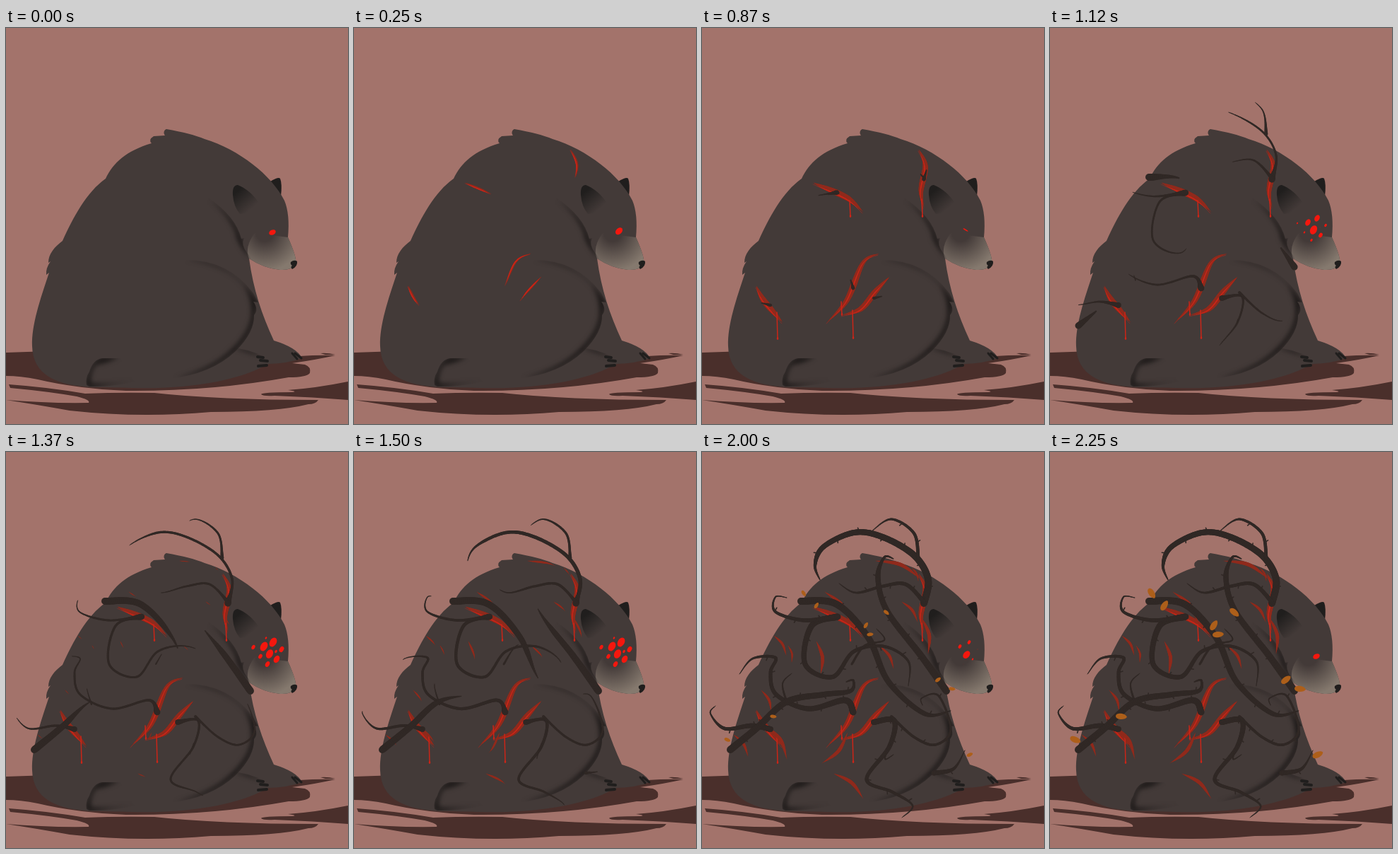
An HTML page with a canvas for the animation above (2500 ms loop, 484 px wide and 560 px high).

```html
<!DOCTYPE html>
<html>
<head>
<meta charset="utf-8">
<style>
html, body { margin: 0; width: 100%; height: 100%; overflow: hidden; background: #a3736b; }
canvas { display: block; }
</style>
</head>
<body>
<canvas id="stage" width="484" height="560"></canvas>
<script>
const ctx = document.getElementById('stage').getContext('2d');
const FUR = '#433a38', DARK = '#201e1d', VINE = '#302825', GROUND = '#4a2f2b';
const GASH = '#902a1c', BLOOD = '#cb2518', EYE = '#f5170e', LEAF = '#ad5f1a';

// Progress from 0 to 1 between steps a and b
const ramp = (k, a, b) => Math.max(0, Math.min(1, (k - a) / (b - a)));
const easeOut = x => 1 - (1 - x) ** 2;
const points = text => text.split(' ').map(s => s.split(',').map(Number));

// Catmull-Rom samples [x, y, distance]
function curve(p) {
  const out = [[...p[0], 0]];
  for (let i = 0; i < p.length - 1; i++) {
    const a = p[i - 1] || p[i], b = p[i], c = p[i + 1], d = p[i + 2] || c;
    for (let n = 1; n <= 20; n++) {
      const t = n / 20;
      const [x, y] = [0, 1].map(j => b[j] + t / 2 * (c[j] - a[j] +
        t * (2 * a[j] - 5 * b[j] + 4 * c[j] - d[j] + t * (3 * (b[j] - c[j]) + d[j] - a[j]))));
      const q = out[out.length - 1];
      out.push([x, y, q[2] + Math.hypot(x - q[0], y - q[1])]);
    }
  }
  return out;
}
const total = c => c[c.length - 1][2];

// Stroke a curve up to a length, with a width that depends on the distance
function brush(c, color, length, width) {
  ctx.strokeStyle = color;
  for (let i = 1; i < c.length && c[i][2] <= length; i++) {
    ctx.lineWidth = Math.max(.3, width(c[i][2]));
    ctx.beginPath();
    ctx.moveTo(c[i - 1][0], c[i - 1][1]);
    ctx.lineTo(c[i][0], c[i][1]);
    ctx.stroke();
  }
}

function spindle(c, color, w, grown = 1) {
  const end = total(c) * grown;
  brush(c, color, end, s => w * Math.sin(Math.PI * Math.min(1, s / end)));
}

function fill(path, color) {
  ctx.fillStyle = color;
  ctx.fill(new Path2D(path));
}

function oval(x, y, rx, ry, turn, color) {
  ctx.fillStyle = color;
  ctx.beginPath();
  ctx.ellipse(x, y, rx, ry, turn, 0, 7);
  ctx.fill();
}

// Soft dark patch that stays inside a shape
function shade(shape, patch) {
  ctx.save();
  ctx.clip(new Path2D(shape));
  ctx.filter = 'blur(3px)';
  fill(patch, '#1e1a19');
  ctx.restore();
}

function fade(path, gradient, from, to) {
  gradient.addColorStop(0, from);
  gradient.addColorStop(1, to);
  fill(path, gradient);
}

function scene() {
  ctx.fillStyle = '#a3736b';
  ctx.fillRect(0, 0, 484, 560);
  fill('M0 459L60 457L380 468Q420 462 466 463Q440 469 405 474L423 476Q432 479 430 488Q425 494 400 494Q290 514 170 513Q100 510 45 497Q20 492 0 492Z' +
    'M445 460Q455 459 466 462L452 462Z', GROUND);
  fill('M4 504Q60 508 112 517Q160 515 210 516Q300 526 442 526Q438 532 428 532Q385 543 290 543Q190 552 90 541Q40 532 0 526Q60 531 117 530Q120 526 100 521Q60 514 6 509Z', GROUND);
  fill('M484 500Q440 509 399 512Q414 514 405 515Q362 515 361 518Q364 521 380 520Q435 522 484 526Z', GROUND);

  fill('M374 217Q386 210 388 213Q391 220 389 238Z', DARK);
  fill('M227 143C224 144 222 148 225 152L209 153Q201 158 206 163C170 174 152 190 141 213C114 232 95 268 80 301C68 310 60 320 60 332L63 330Q56 340 57 349L61 346C48 385 36 420 37 450C38 490 70 506 125 508C160 508 180 510 215 509C280 507 330 495 357 482L372 475Q400 474 419 467Q412 452 379 442C362 405 350 370 344 326Q365 340 388 342Q405 343 410 333Q412 325 399 296Q402 263 394 244C376 208 330 172 281 157Q262 149 227 143Z', FUR);

  fade('M344 326Q337 310 352 290L399 296Q412 325 410 333Q405 343 388 342Q365 340 344 326Z',
    ctx.createRadialGradient(366, 290, 12, 366, 290, 54), FUR, '#85796e');
  fill('M403 331Q408 327 412 330Q413 337 405 341Q402 338 405 336Q402 334 403 331Z', DARK);
  fade('M321 236Q320 222 328 222Q346 229 360 250Q348 263 331 263Q322 252 321 236Z',
    ctx.createLinearGradient(324, 234, 345, 258), DARK, FUR);

  shade('M286 240Q325 266 333 298L337 297Q332 306 341 318L347 326L330 350L250 350Z',
    'M288 242Q325 268 334 298L346 326Q326 305 325 290Q315 265 288 242Z');
  shade('M255 328Q315 328 350 375L357 388L350 387Q358 398 351 406Q352 430 325 457Q290 490 230 496L200 400Z',
    'M257 328Q320 329 357 388L353 406Q352 430 325 457Q290 489 240 495Q290 482 318 455Q345 430 347 405Q348 380 335 362Q310 335 257 328Z');
  shade('M318 452Q342 453 365 465L360 482L310 478Z', 'M322 452Q342 453 364 465Q340 459 322 452Z');
  shade('M114 505Q112 495 118 486Q123 469 136 467L162 467L182 500Q150 508 118 507Z',
    'M160 465L136 465Q118 470 112 505L118 509L184 499Q140 505 120 502Q119 485 128 476Q140 476 160 465Z');

  ctx.strokeStyle = DARK;
  ctx.lineWidth = 4;
  ctx.stroke(new Path2D('M356 465L364 466M360 470L370 471M357 478L369 477'));
  ctx.lineWidth = 3;
  ctx.stroke(new Path2D('M405 460L412 468M409 460L418 467'));
}

// Large gashes: curve, then the drip as x, top, bottom
const gashes = [
  ['307,172 316,195 310,230 314,254', 312, 242, 266],
  ['158,219 205,240 228,260', 210, 244, 266],
  ['77,365 88,386 114,416', 107, 402, 439],
  ['250,319 228,332 205,385 177,416', 198, 387, 405],
  ['265,352 246,372 225,397 198,406', 214, 399, 438]
].map(([text, ...drip]) => [curve(points(text)), drip]);

// Small gashes bend a little to one side between their two ends
const scratches = [
  '102,260 119,287', '122,274 127,297', '162,268 168,314', '246,154 310,180', '297,164 306,182',
  '283,212 305,240', '84,337 98,367', '174,198 210,242', '187,455 228,490', '252,275 271,306',
  '206,397 170,440', '92,388 120,434', '45,400 65,430', '311,235 320,285'
].map(text => {
  const [[x, y], [u, v]] = points(text);
  return curve([[x, y], [(x + u) / 2 + (v - y) * .12, (y + v) / 2 - (u - x) * .12], [u, v]]);
});

function wounds(k) {
  const grown = ramp(k, 0, 4), open = .2 + .8 * ramp(k, 1, 7), drop = ramp(k, 2, 7);
  if (grown) for (const [c, [x, top, bottom]] of gashes) {
    spindle(c, GASH, 8.5 * open, grown);
    ctx.save();
    ctx.translate(-1, 2 * open);
    spindle(c, BLOOD, 1.6, grown);
    ctx.restore();
    if (!drop) continue;
    const tip = top + (bottom - top) * easeOut(drop);
    brush([[x - 1, top], [x, tip, 1]], BLOOD, 1, () => 1.5);
    oval(x, tip, 1.3, 2, 0, BLOOD);
  }
  const more = easeOut(ramp(k, 10.5, 15));
  if (more) for (const c of scratches) spindle(c, GASH, Math.min(5, total(c) * .1) * more, more);
}

// Vines: width, step at which growth starts, key points from root to tip
const vines = [
  [10, 6.8, '314,214 320,180 300,146 255,120 215,114 172,134 160,160 167,181'],
  [5, 7, '306,150 300,115 268,95 240,112'],
  [6, 6.8, '314,212 288,187 255,190 218,199 194,186'],
  [10, 8, '140,211 190,215 235,262 264,325 315,370 352,366'],
  [9, 6.8, '192,233 155,246 146,300 185,318 215,282 258,275 292,296 292,331'],
  [3, 10, '212,300 230,274 258,266 247,250'],
  [7, 6, '191,232 145,238 104,226 104,205 120,206'],
  [9, 6.8, '214,368 202,351 150,363 105,343 97,312 104,291 72,292 53,314'],
  [3, 8, '121,357 114,328 127,313'],
  [8, 6.5, '97,392 70,387 32,391 12,370 19,359'],
  [10, 8, '40,421 78,390 120,353 172,343 210,338 214,323 204,325'],
  [8, 6.8, '243,382 272,380 265,417 233,463 270,481 298,500 283,517'],
  [4, 7.5, '268,374 300,403 330,414 352,393 335,345 311,348 312,358'],
  [3, 8, '266,412 259,434 271,428'],
  [10, 8, '346,338 310,288 262,225 249,178 258,149 271,151'],
  [7, 11, '328,454 356,448 372,422']
].map(([w, start, text]) => [w, start, curve(points(text))]);

function thorns(c, end, w, size) {
  ctx.strokeStyle = VINE;
  ctx.lineWidth = 1.6;
  for (let d = 22, side = 1; d < end - 25; d += 34, side = -side) {
    const i = c.findIndex(q => q[2] > d), [x, y] = c[i];
    const a = Math.atan2(c[i + 1][1] - y, c[i + 1][0] - x) + side * 1.2;
    const r = w * .5 + 3.5 * size;
    ctx.beginPath();
    ctx.moveTo(x, y);
    ctx.lineTo(x + r * Math.cos(a), y + r * Math.sin(a));
    ctx.stroke();
  }
}

function growVines(k) {
  const thorn = ramp(k, 12, 16);
  for (const [w, start, c] of vines) {
    const x = ramp(k, start, 14.5), early = start < 8;
    if (!x) continue;
    const end = total(c) * (early ? easeOut(x) : x);
    const thick = early ? ramp(k, 10.5, 14.5) : 1;
    const fall = w < 10 ? 1 : .3;
    brush(c, VINE, end, s => {
      const body = Math.max(thick * (1 - s / end) ** fall, Math.exp(-s / 12));
      return (2.6 + (w - 2.6) * body) * Math.min(1, .35 + (end - s) / 60);
    });
    if (thorn && w > 3) thorns(c, end, w * .6, thorn);
  }
}

// Leaves: x, y, angle
const leaves = points('144,200,1 162,217,-1 232,245,-1 238,258,-.1 261,227,.7 ' +
  '334,322,-.65 354,335,.1 101,374,.1 36,407,.4 379,428,-.45');

function growLeaves(k) {
  const size = ramp(k, 12.5, 18) ** 1.2;
  if (size) for (const [x, y, a] of leaves) {
    const l = 8 * size, h = 5.5 * size;
    ctx.save();
    ctx.translate(x, y);
    ctx.rotate(a);
    fill(`M${-l} 0C${-l} ${-h} ${l * .7} ${-h} ${l} 0C${l * .7} ${h} ${-l} ${h} ${-l} 0Z`, LEAF);
    ctx.restore();
  }
}

// Extra eyes: x, y, size; the large ones show first
const extraEyes = points('350,276,3.4 365,275,7 378,269,7 368,263,1.8 383,293,5.6 360,289,3.6 370,300,4.2 390,279,4.4 382,282,2.4');

function eyes(k) {
  const spread = easeOut(ramp(k, 7, 11)) * (1 - ramp(k, 15, 17));
  for (const [x, y, size] of extraEyes) {
    const r = size - 8 * (1 - spread);
    if (r > 0) oval(x, y, r, r * .68, -1.05, EYE);
  }
  const wide = ramp(k, 0, 4) - ramp(k, 15, 18);
  const shut = ramp(k, 5, 7) - ramp(k, 7, 9);
  oval(377 - 4 * wide, 289 - 3.5 * wide, (5 + 1.6 * wide) * (1 - .4 * shut),
    (3.5 + 1.2 * wide) * (1 - .8 * shut), -.45 - .65 * wide + 1.6 * shut, EYE);
}

ctx.lineJoin = 'round';
let shown = -1;
function draw() {
  const t = performance.now() % 2500;
  // The picture moves in eighths of a second and rests at the end
  const k = Math.min(18, Math.floor((Math.floor(t / 10) + .5) / 12.5));
  if (k !== shown) {
    shown = k;
    ctx.lineCap = 'round';
    scene();
    wounds(k);
    growVines(k);
    growLeaves(k);
    eyes(k);
  }
  requestAnimationFrame(draw);
}
draw();
</script>
</body>
</html>
```
